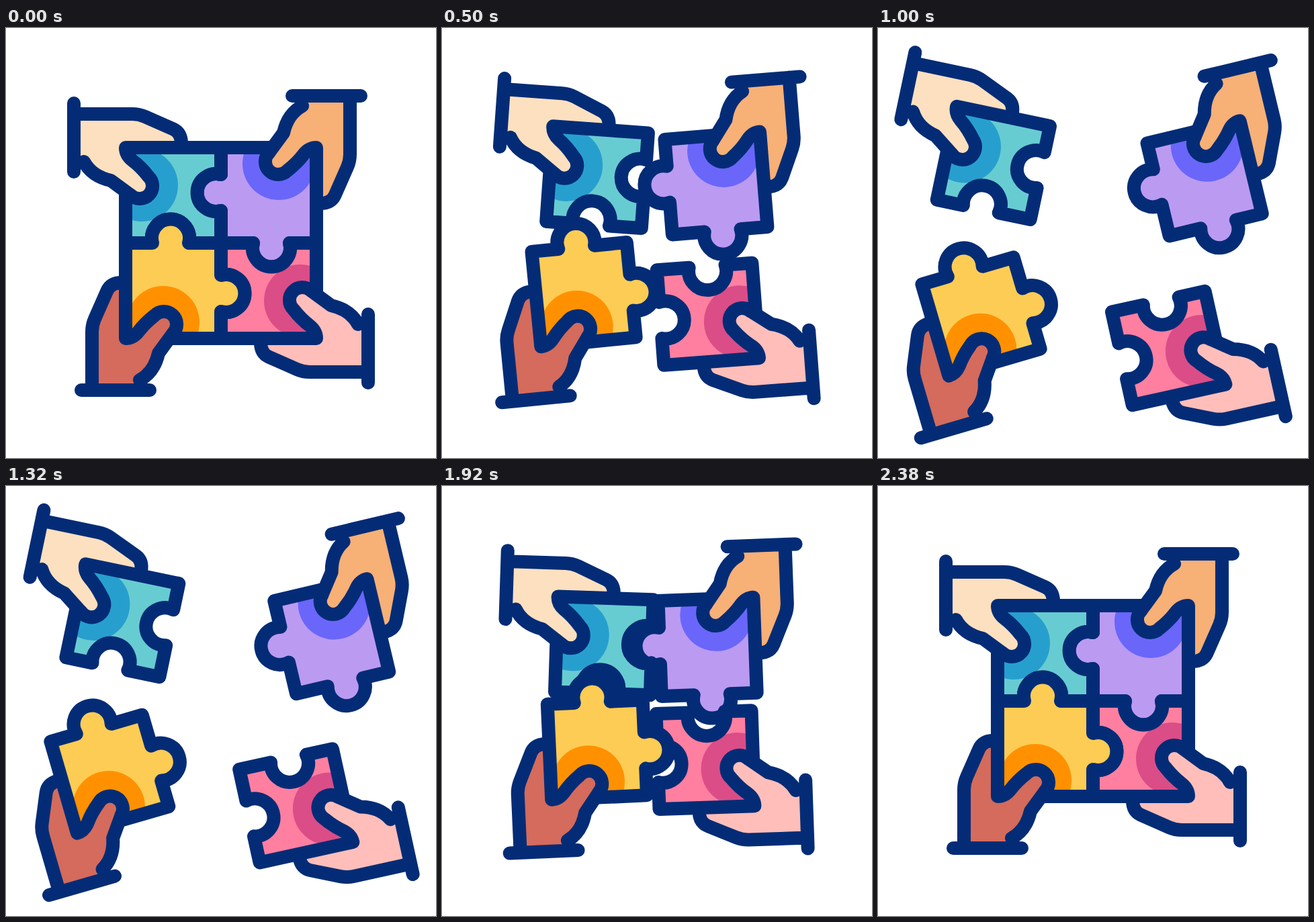
Write an HTML page that moves like this. It is 640 px wide and 640 px high and loops after 2400 ms.

```html
<!DOCTYPE html>
<html lang="en">
<head>
<meta charset="utf-8">
<title>Puzzle teamwork</title>
<style>
  html, body { margin: 0; width: 100%; height: 100%; overflow: hidden; background: #fff; }
  svg { display: block; width: 100%; height: 100%; }
  .line { fill: none; stroke: #042c76; stroke-width: 20; stroke-linecap: round; stroke-linejoin: round; }
</style>
</head>
<body>
<svg id="stage" viewBox="0 0 640 640"></svg>
<script>
const LOOP = 2400, PEAK = 1120;

// Shapes are drawn as the top-left piece and turned by quarters.
const finger = 'M101 128H188Q198 128 207 132L249 150.5Q261 156 261 172V178';
const wrist = 'M116 199C124 214 138 223 156 227L186 249';
const palm = finger + 'L212 221A19.1 19.1 0 0 1 186 249L156 227C138 223 124 214 116 199L101 197Z';
const piece = out => `M178 178H320V218A28 28 0 1 ${out} 320 272V320
  H272A28 28 0 1 ${out} 218 320H178V247L186 249A19.1 19.1 0 0 0 212 221
  C205 212 196 203 188 197Q178 189 178 178Z`;

// x and y: coefficients of p, p², p³ for the drift; angle in degrees
const parts = [
  { turn: 90, out: 1, cx: 391, cy: 249, skin: '#f7b076', body: '#bb9af2', shade: '#6a66fa',
    angle: -13.6, x: [2.7, 162.9, -69.6], y: [-70, 52, -7] },
  { turn: 0, out: 0, cx: 249, cy: 249, skin: '#fde0bf', body: '#67ccd1', shade: '#279fce',
    angle: 12, x: [-48.5, -4.8, -24.8], y: [-59.7, -92.9, 105] },
  { turn: 180, out: 0, cx: 391, cy: 391, skin: '#ffbeb9', body: '#ff7fa0', shade: '#db4d87',
    angle: -12.6, x: [0, 42.3, 0], y: [111, -25, 0] },
  { turn: 270, out: 1, cx: 249, cy: 391, skin: '#d46b5c', body: '#fdcc54', shade: '#ff9100',
    angle: -16.5, x: [-120, 24, 0], y: [5, 34, 0] }
];

const stage = document.getElementById('stage');
stage.innerHTML = `<defs>${[0, 1].map(o =>
  `<clipPath id="clip${o}"><path d="${piece(o)}"/></clipPath>`).join('')}</defs>` +
  parts.map(p => `<g class="part"><g transform="rotate(${p.turn} 320 320)">
    <path d="${palm}" fill="${p.skin}"/>
    <path class="line" d="${finger}${wrist}M101 112V214"/>
    <path d="${piece(p.out)}" fill="${p.body}"/>
    <circle cx="202" cy="234" r="54" fill="${p.shade}" clip-path="url(#clip${p.out})"/>
    <path class="line" d="${piece(p.out)}"/>
  </g></g>`).join('');
const groups = stage.querySelectorAll('.part');

// cubic-bezier(.74, 0, .235, 1)
function ease(t) {
  let lo = 0, hi = 1;
  for (let i = 0; i < 24; i++) {
    const s = (lo + hi) / 2, r = 1 - s;
    if (3 * r * r * s * 0.74 + 3 * r * s * s * 0.235 + s * s * s < t) lo = s; else hi = s;
  }
  return lo * lo * (3 - 2 * lo);
}

const drift = ([a, b, c], p) => p * (a + p * (b + p * c));

function draw(ms) {
  const p = ms < PEAK ? ease(ms / PEAK) : 1 - ease((ms - PEAK) / (LOOP - PEAK));
  parts.forEach((q, i) => groups[i].setAttribute('transform',
    `translate(${drift(q.x, p)} ${drift(q.y, p)}) rotate(${q.angle * p} ${q.cx} ${q.cy})`));
}

const start = performance.now();
function tick() {
  draw((performance.now() - start) % LOOP);
  requestAnimationFrame(tick);
}
draw(0);
requestAnimationFrame(tick);
</script>
</body>
</html>
```
